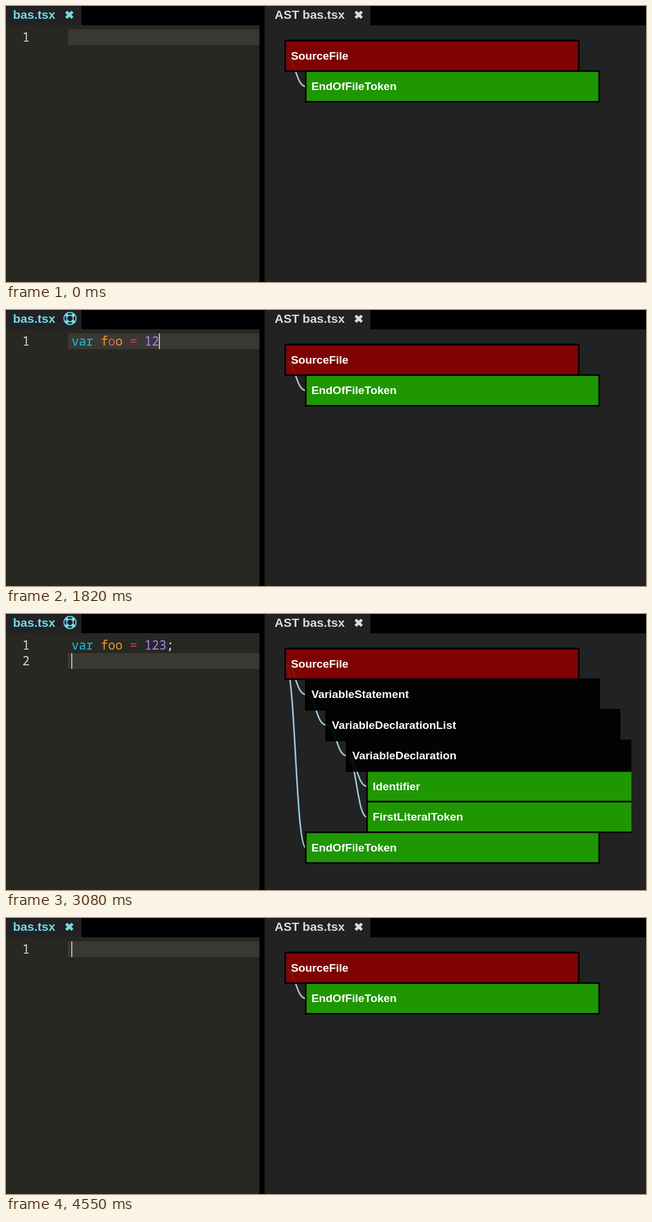
Write an HTML page that moves like this. It is 1096x473 px and loops after 4690 ms.

```html
<!DOCTYPE html>
<html lang="en">
<head>
<meta charset="utf-8">
<title>Live syntax tree</title>
<style>
  html, body { margin: 0; width: 100%; height: 100%; overflow: hidden; background: #000; }
  svg { display: block; width: 1096px; height: 473px; }
  text { white-space: pre; }
  .tab { font: bold 21px "Liberation Sans", Arial, sans-serif; }
  .code { font: 20.83px "Noto Sans Mono", Consolas, monospace; }
  .hint { font: 18.7px "Noto Sans Mono", Consolas, monospace; }
  .note { font: 12.82px "Noto Sans Mono", Consolas, monospace; fill: #d2d2d0; }
  .node text { font: bold 19.25px "Liberation Sans", Arial, sans-serif; fill: #fff; }
  .node rect { stroke: #000; stroke-width: 2.6; fill-opacity: .92; }
  .link { fill: none; stroke: #9ecae1; stroke-width: 2.6; }
</style>
</head>
<body>
<svg viewBox="0 0 1096 473">
  <defs>
    <clipPath id="pane"><rect x="443" y="33" width="628" height="440"/></clipPath>
    <path id="cross" d="M-5.4-5.2 5.4 5.2M5.4-5.2-5.4 5.2" stroke-width="5"/>
    <g id="ring" fill="none">
      <circle r="10.4" stroke-width="1.7"/>
      <circle r="5.6" stroke-width="1.7"/>
      <path d="M-7-7-4-4M7-7 4-4M-7 7-4 4M7 7 4 4" stroke-width="5.4"/>
    </g>
    <g id="swap">
      <path d="M-9.5-3.6H5M9.5 3.6H-5" stroke-width="2.4"/>
      <path d="M4-8 9.8-3.6 4 .6ZM-4 8-9.8 3.6-4-.6Z" stroke="none"/>
    </g>
  </defs>

  <rect width="1096" height="473"/>
  <rect width="129" height="34" fill="#222"/>
  <rect y="33" width="434" height="440" fill="#272822"/>
  <rect x="443" width="181" height="34" fill="#222"/>
  <rect x="443" y="33" width="653" height="440" fill="#222"/>
  <text class="tab" x="12" y="22" fill="#70dcec">bas.tsx</text>
  <text class="tab" x="460" y="22" fill="#dcdcdc">AST bas.tsx</text>
  <use href="#cross" x="604" y="15" stroke="#dcdcdc"/>
  <use id="saved" href="#cross" x="108.5" y="15" stroke="#70dcec"/>
  <use id="dirty" href="#ring" x="109.6" y="14.5" stroke="#70dcec"/>

  <rect id="active" x="106" width="328" height="27" fill="#393932"/>
  <rect id="selection" x="112" y="40" width="315" height="27" fill="#49483e"/>
  <g class="code">
    <text x="28" y="61" fill="#d8d8d2">1</text>
    <text id="line2" x="28" y="88" fill="#d8d8d2">2</text>
    <text id="code" x="112.3" y="61"></text>
  </g>
  <rect id="cursor" width="1.3" height="27" fill="#f8f8f0"/>

  <g id="graph" clip-path="url(#pane)"></g>

  <g id="popup">
    <rect x="165" y="70" width="545" height="128" fill="#000" opacity=".2"/>
    <rect x="163" y="67.5" width="544.5" height="128" fill="#272822" stroke="#3a3a38"/>
    <g id="rows"></g>
    <rect x="709.5" y="67.5" width="223" height="34" rx="3" fill="#333" stroke="#fff" stroke-width="3"/>
    <text class="hint" x="720" y="92" fill="#dcdcdc">iterate over array</text>
  </g>
</svg>

<script>
const LOOP = 4690, STEP = 70, CHAR = 12.5;
const ROW = 52.5, INDENT = 35, LEFT = 478.3, TOP = 85.4;
const RED = "#880000", GREEN = "#1fa101", BLACK = "#000";
const $ = id => document.getElementById(id);

// [label, depth, fill, parent index]
const EMPTY_TREE = [["SourceFile", 0, RED], ["EndOfFileToken", 1, GREEN, 0]];
const FULL_TREE = [
  ["SourceFile", 0, RED],
  ["VariableStatement", 1, BLACK, 0],
  ["VariableDeclarationList", 2, BLACK, 1],
  ["VariableDeclaration", 3, BLACK, 2],
  ["Identifier", 4, GREEN, 3],
  ["FirstLiteralToken", 4, GREEN, 3],
  ["EndOfFileToken", 1, GREEN, 0]
];

const SOURCE = "var foo = 123;";
// [time, characters typed]
const TYPING = [
  [0, 0], [630, 1], [700, 2], [840, 3], [910, 4], [980, 5], [1120, 6], [1260, 7],
  [1470, 8], [1540, 9], [1610, 10], [1750, 11], [1820, 12], [1890, 13], [1960, 14], [3570, 0]
];
const BLINKS = [490, 2660, 3080, 3430, 3570, 4060, 4550];
const NEWLINE = 2170, SELECT = 3430, DELETE = 3570;
const GROW = 2660, SHRINK = 4060, LEAD = 108, DURATION = 500;

const SNIPPETS = [
  ["for", "iterate over array"],
  ["fort", "iterate over array with temporary variable"],
  ["forin", "iterate using for .. in"],
  ["forof", "iterate using for .. of"]
];

$("rows").innerHTML = SNIPPETS.map(([name, note], i) => {
  const y = 72 + 30 * i, on = i === 0, ink = on ? "#fff" : "#f92672";
  return `<rect x="167" y="${y}" width="128" height="30" fill="${on ? "#337fee" : "#51303a"}"/>
    ${on ? `<rect x="295" y="${y}" width="409" height="30" fill="#0088ff"/>` : ""}
    <use href="#swap" x="184" y="${y + 16}" fill="${ink}" stroke="${ink}"/>
    <text class="hint" x="209" y="${y + 22}" fill="${ink}" style="font-weight:${on ? 700 : 400}">snippet</text>
    <text class="hint" x="302" y="${y + 22}" fill="#fff" style="font-weight:600">${name}</text>
    <text class="note" x="373" y="${y + 22}">${note}</text>`;
}).join("");

const show = (id, on) => $(id).setAttribute("visibility", on ? "visible" : "hidden");
const within = (t, from, to) => t >= from && t < to;

function ease(x) {
  x = Math.min(1, Math.max(0, x));
  return x < .5 ? 4 * x ** 3 : 1 - 4 * (1 - x) ** 3;
}

// Everything unfolds from the root: p = 0 is folded, p = 1 is laid out.
function drawTree(tree, p) {
  const place = i => [LEFT + tree[i][1] * INDENT * p, TOP + i * ROW * p];
  const links = tree.map(([, , , parent], i) => {
    if (parent === undefined) return "";
    const [x0, y0] = place(parent), [x1, y1] = place(i), mid = (x0 + x1) / 2;
    return `<path class="link" d="M${x0} ${y0}C${mid} ${y0} ${mid} ${y1} ${x1} ${y1}"/>`;
  });
  const nodes = tree.map(([label, , fill], i) => {
    const [x, y] = place(i);
    return `<g class="node" opacity="${p}" transform="translate(${x} ${y})">
      <rect y="${-ROW / 2}" width="502.5" height="${ROW}" fill="${fill}"/>
      <text x="9.6" y="6.1">${label}</text></g>`;
  });
  $("graph").innerHTML = links.join("") + nodes.join("");
}

function inkOf(i, count, t) {
  if (i < 3) return count < 3 ? "#f8f8f2" : "#12c4e6";
  if (i === 5 && t < NEWLINE) return "#ec5568";
  if (i < 7) return "#f5972a";
  if (i === 8) return "#f92672";
  return i === 13 ? "#f8f8f2" : "#ae81ff";
}

function drawEditor(t) {
  const count = TYPING.filter(([at]) => at <= t).pop()[1];
  const second = within(t, NEWLINE, DELETE);
  const selected = within(t, SELECT, DELETE);
  const dirty = within(t, 630, DELETE);

  $("code").innerHTML = [...SOURCE.slice(0, count)]
    .map((c, i) => `<tspan fill="${inkOf(i, count, t)}">${c}</tspan>`).join("");
  $("active").setAttribute("y", second ? 67 : 40);
  $("cursor").setAttribute("x", 112 + (second ? 0 : Math.round(count * CHAR)));
  $("cursor").setAttribute("y", second ? 67 : 40);

  show("cursor", BLINKS.filter(at => at <= t).length % 2);
  show("active", !selected);
  show("selection", selected);
  show("line2", second);
  show("dirty", dirty);
  show("saved", !dirty);
  show("popup", within(t, 1190, 1330));
}

let last = -1;
function frame(now) {
  const t = Math.floor(now % LOOP / STEP) * STEP;
  if (t !== last) {
    last = t;
    drawEditor(t);
    const full = within(t, GROW, SHRINK);
    const start = full ? GROW : SHRINK;
    const p = t < GROW ? 1 : ease((t - start + LEAD) / DURATION);
    drawTree(full ? FULL_TREE : EMPTY_TREE, p);
  }
  requestAnimationFrame(frame);
}
frame(performance.now());
</script>
</body>
</html>
```
